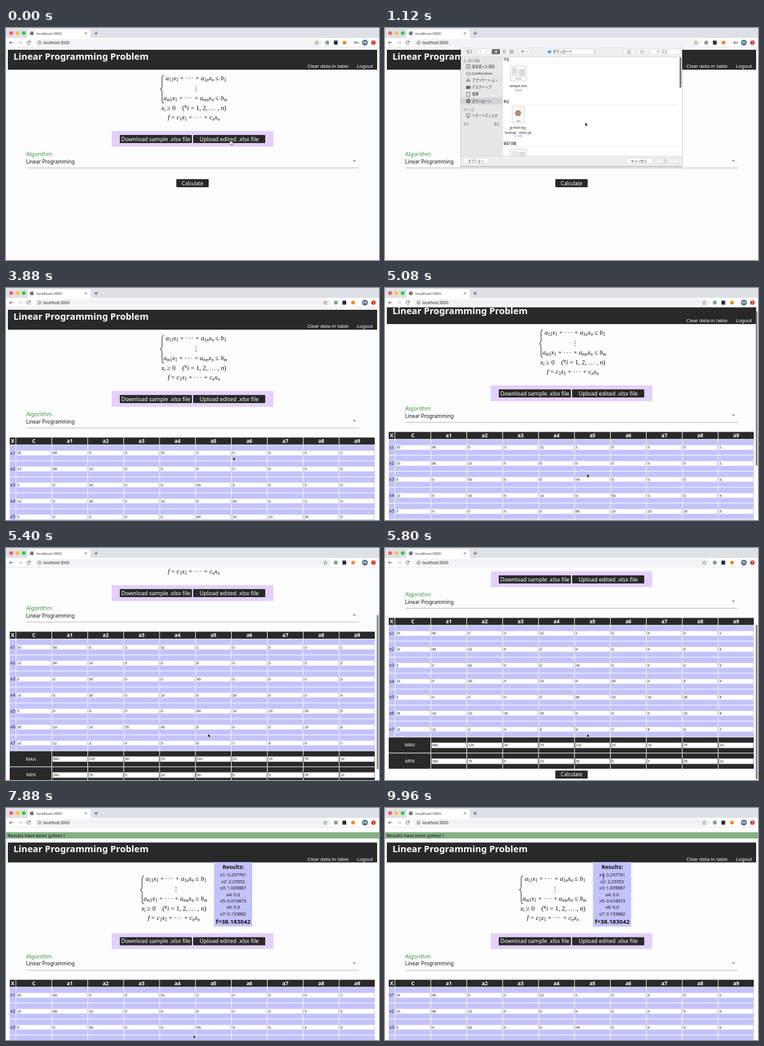
An HTML page that plays this animation: 600 px wide and 373 px high, repeating every 10000 ms.

```html
<!DOCTYPE html>
<html lang="en">
<head>
<meta charset="utf-8">
<style>
html, body { margin: 0; width: 100%; height: 100%; overflow: hidden; background: #fdfdfd; }
svg { display: block; width: 600px; height: 373px; }
text { font-family: "Noto Sans", "Open Sans", sans-serif; white-space: pre; }
#sheet text { font-family: "Noto Sans CJK JP", "Noto Sans CJK", "Noto Sans", sans-serif; }
#formula text { font: 10.6px "Liberation Serif", serif; text-anchor: middle; }
#formula i { font-style: italic; }
.cell { font-family: "Liberation Sans", Arial, sans-serif; }
</style>
</head>
<body>
<svg id="stage" viewBox="0 0 600 373" xmlns="http://www.w3.org/2000/svg"></svg>
<script>
const DARK = '#292929', LILAC = '#c3c3fc', INK = '#111';
const LOOP = 10, UPLOADED = 3.64, SOLVED = 7.44, SELECTED = 1.72;

const rect = (x, y, w, h, fill, more = '') =>
  `<rect x="${x}" y="${y}" width="${w}" height="${h}" fill="${fill}" ${more}/>`;
const text = (x, y, size, str, fill = INK, more = '') =>
  `<text x="${x}" y="${y}" font-size="${size}" fill="${fill}" ${more}>${str}</text>`;
const mid = (x, y, size, str, fill, more = '') =>
  text(x, y, size, str, fill, 'text-anchor="middle" ' + more);
const dot = (x, y, r, fill, more = '') => `<circle cx="${x}" cy="${y}" r="${r}" fill="${fill}" ${more}/>`;
const line = (d, color, width = 1, more = '') =>
  `<path d="${d}" fill="none" stroke="${color}" stroke-width="${width}" ${more}/>`;
const group = (id, ...parts) => `<g id="${id}">${parts.join('')}</g>`;
const button = (x, y, w, label, size) =>
  rect(x, y, w, 13, DARK, 'rx="1"') + mid(x + w / 2, y + 9.7, size, label, '#fff');

// Math: *x* is italic, _x_ a subscript, ^x^ a superscript
function math(x, y, src) {
  const body = src
    .replace(/\*(.+?)\*/g, '<tspan font-style="italic">$1</tspan>')
    .replace(/_(.+?)_/g, '<tspan font-size="7.2" dy="2">$1</tspan><tspan dy="-2">\u200b</tspan>')
    .replace(/\^(.+?)\^/g, '<tspan font-size="6.5" dy="-3">$1</tspan><tspan dy="3">\u200b</tspan>')
    .replace(/~/g, '<tspan letter-spacing="1">···</tspan>');
  return `<text x="${x}" y="${y}" fill="${INK}">${body}</text>`;
}

function formula() {
  const row = (y, r, x) => math(x, y, `*a*_${r}1_*x*_1_ + ~ + *a*_${r}*n*_*x*_*n*_ ≤ *b*_${r}_`);
  return group('formula',
    line('M254 76q-3 0-3 4v14q0 4-3 4.500q3 .5 3 4.500v14q0 4 3 4', INK, 0.9),
    row(84, '1', 305.5), [94.5, 98, 101.5].map(y => dot(305.5, y, 0.65, INK)).join(''),
    math(304.5, 116, '*a*_*m*1_*x*_1_ + ~ + *a*_*mn*_*x*_*n*_ ≤ *b*_*m*_'),
    math(302, 132, '*x*_*i*_ ≥ 0    (^∀^*i* = 1, 2, … , *n*)'),
    math(302, 147, '*f* = *c*_1_*x*_1_ + ~ + *c*_*n*_*x*_*n*_'));
}

function table() {
  const rows = ['20 60 5 3 31 1 0 0 0 1', '10 80 10 5 0 0 0 0 5 2', '5 0 50 0 0 45 5 0 0 3',
    '10 5 30 5 10 0 50 0 0 4', '5 0 0 0 0 60 10 10 20 5', '35 10 10 25 45 0 0 0 10 6',
    '10 11 3 4 5 6 7 8 9 7', ' 900 125 30 70 110 15 15 75 14', ' 200 75 5 10 50 5 5 25 12'];
  const colX = c => 16.4 + 57.78 * c, width = 56.8;
  const head = (x, w, s) => rect(x, 240.4, w, 11.3, DARK) + mid(x + w / 2, 249.2, 8.2, s, '#fff', 'font-weight="700"');
  let out = head(6, 9.5, 'X');
  for (let c = 0; c < 10; c++) out += head(colX(c), width, c ? 'a' + c : 'C');
  rows.forEach((row, r) => {
    const y = 252.6 + 25.7 * r, limit = r > 6, fill = limit ? DARK : LILAC;
    out += rect(6, y, limit ? 67.2 : 9.5, 24.7, fill);
    out += limit ? mid(40, y + 15, 7.8, r > 7 ? 'MIN' : 'MAX', '#fff') : mid(10.9, y + 15, 7.6, 'x' + (r + 1), '#223');
    row.split(' ').forEach((v, c) => {
      if (!v) return;
      const x = colX(c);
      out += rect(x, y, width, 24.7, fill) +
        rect(x + 0.9, y + 8.6, width - 1.5, 8.2, '#fff', 'stroke="#c4c4cc" stroke-width=".6"') +
        text(x + 2, y + 14.8, 5.4, v, INK, 'class="cell"');
    });
  });
  return group('table', out);
}

function results() {
  const values = ['0.297761', '2.25552', '1.009887', '0.0', '0.616873', '0.0', '0.153882'];
  return group('results',
    rect(0, 39, 600, 10, '#84b184'), text(3, 46.5, 7.4, 'Results have been gotten !'),
    rect(334.5, 87, 61.5, 103.5, LILAC),
    mid(365.5, 98, 8.8, 'Results:', INK, 'font-weight="700"'),
    ...values.map((v, i) => mid(365.5, 110.4 + 10.4 * i, 7.1, `x${i + 1}: ${v}`)),
    mid(365.5, 186, 9.6, 'f=38.183042', INK, 'font-weight="700"'));
}

function page() {
  return group('page',
    group('header', rect(3, 35, 594, 32, DARK),
      text(12, 50.6, 14.7, 'Linear Programming Problem', '#fff', 'font-weight="600"'),
      text(485, 64, 7.75, 'Clear data in table', '#fff'), text(564.5, 64, 7.75, 'Logout', '#fff')),
    formula(),
    group('lower', rect(170, 165.5, 260, 25.5, '#e3d1fb'),
      button(183, 172, 116, 'Download sample .xlsx file', 8.95),
      button(301, 172, 116, 'Upload edited .xlsx file', 8.95),
      text(32.5, 206, 8.75, 'Algorithm', '#3d8f43'), text(32.5, 217.6, 8, 'Linear Programming'),
      line('M33 225H567.500', '#a5a5a5', 0.8), '<path d="M558 212.500h5l-2.500 2.800z" fill="#888"/>',
      table(), group('calc', button(274, 243, 52, 'Calculate', 8))),
    results());
}

function sheet() {
  const box = (x, w) => rect(x, 34, w, 8, '#fff', 'rx="1.5" stroke="#ccc" stroke-width=".5"');
  const gray = '#666';
  const push = (x, label, fill = '#fff', ink = '#222', id = '') =>
    rect(x, 209.500, 41, 8, fill, `rx="1.5" stroke="#c4c4c4" stroke-width=".5" ${id}`) + mid(x + 20.5, 215.5, 5.2, label, ink);
  const places = ['最近使った項目', 'Cumbra Drive', 'アプリケーション', 'デスクトップ', '書類', 'ダウンロード'];
  const icons = [
    rect(131, 59, 6, 6, 'none', `stroke="${gray}" stroke-width=".8"`) + line('M132.500 61h3m-3 2h3', gray, 0.7),
    line('M131.500 75q-2-2.500 1-3q1-3 3.500 0q3 .5 1.500 3z', gray, 0.8),
    line('M131 87l3-6l3 6m-6-2h6', gray, 0.9),
    rect(130.5, 93, 7, 5, gray), rect(131.5, 103.5, 5, 6.5, 'none', `stroke="${gray}" stroke-width=".8"`),
    dot(134, 117.5, 3.3, '#555') + line('M134 115.500v3.500m-1.500-1.500l1.500 1.500l1.500-1.500', '#fff', 0.8)];
  const doc = (x, y, w, h) => rect(x, y, w, h, '#fafafa', 'stroke="#bbb" stroke-width=".6"');
  const sample = y => doc(202, y, 25, 24) + rect(204, y + 2, 9, 15, '#e8e8e8') + rect(215, y + 5, 10, 12, '#ddd') +
    line(`M205 ${y + 5}h7m-7 3h7m-7 3h7m4-2h8m-8 3h8`, '#bbb', 0.6) + mid(214.5, y + 22, 4, 'XLSX', '#777');
  const heading = (y, s) => text(191, y, 4.3, s, '#333', 'font-weight="700"') + line(`M191 ${y + 3.5}H472`, '#e1e1e1', 0.6);
  return group('sheet',
    rect(121, 28, 358, 196, '#000', 'opacity=".1" rx="2"'), rect(121.500, 28, 357, 195, '#000', 'opacity=".2"'),
    rect(122, 28, 356, 194, '#efefef'), rect(122, 46.5, 67, 160, '#e7e7e8'), rect(189, 46.5, 289, 159.5, '#fff'),
    line('M122 46.500H478M122 206H478M189 46.500V206', '#ccc', 0.6),
    box(129, 13) + rect(132, 36, 7, 4, 'none', 'stroke="#555" stroke-width=".7"') + line('M134 36v4', '#555', 0.7),
    box(149, 20) + line('M154.500 36l-2 2l2 2m8-4l2 2l-2 2', '#999', 0.7),
    box(172, 38) + rect(172, 34, 13, 8, '#666', 'rx="1.5"'),
    [176.5, 179].map(x => rect(x, 36, 1.6, 1.6, '#fff') + rect(x, 38.5, 1.6, 1.6, '#fff')).join(''),
    line('M189 36h6m-6 2h6m-6 2h6M200.500 36h6v4h-6zm2 0v4m2-4v4', '#666', 0.7),
    box(215, 17) + line('M219 36.500h5m-5 2h5m3-.5l1 1l1-1', '#666', 0.9),
    box(258, 84) + rect(261.5, 36, 6, 4.5, '#52a7e0', 'rx=".6"') + text(270, 40, 5.2, 'ダウンロード') +
      line('M336.500 37l1-1.500l1 1.500m-2 2l1 1.500l1-1.500', '#555', 0.7),
    box(384, 17) + line('M391 37.500h-1v3h5v-3h-1m-1.500 1.500v-4m-1.200 1.200l1.200-1.200l1.200 1.200', '#555', 0.6),
    box(406, 15) + rect(410.5, 36.5, 6, 3.2, 'none', 'rx="1" stroke="#555" stroke-width=".6"'),
    box(426, 48) + dot(439, 37.5, 1.5, 'none', 'stroke="#777" stroke-width=".6"') + line('M440 38.500l1.500 1.500', '#777', 0.6) +
      text(444.500, 40, 5.2, '検索', '#999'),
    rect(122, 112, 67, 11, '#d3d3d5'),
    text(126, 53.5, 4.4, 'よく使う項目', '#555'),
    ...places.map((s, i) => icons[i] + text(140, 64 + 11.1 * i, 5.2, s, '#222')),
    text(126, 132.5, 4.4, 'デバイス', '#555'), line('M131 138h6v4h-6zm3 4v2m-2 0h4', gray, 0.8),
    text(140, 143, 5.2, 'リモートディスク', '#222'),
    text(126, 155.5, 4.4, 'タグ', '#555'), text(175.5, 155.5, 4.4, '表示', '#555'),
    heading(52.3, '今日'), group('selBox', rect(199, 57.5, 31, 31, '#d5d5d5', 'rx="2"')), sample(61),
    group('selLabel', rect(197.5, 89.5, 33.5, 7.2, '#1660d8', 'rx="1.5"')),
    mid(214.3, 95, 5.2, 'sample.xlsx', INK, 'id="sampleName"'), mid(214.3, 101.5, 4.3, '10 KB', '#4a7ee0'),
    heading(120, '昨日'), doc(204.5, 126, 19.5, 26), dot(214, 137, 5, '#b08d77'), mid(214.3, 150.5, 4, 'JAR', '#777'),
    mid(214.3, 162, 5.1, 'jp-fout-log-'), mid(214.3, 169.5, 5.1, 'hadoop...ution.jar'), mid(214.3, 175.5, 4.3, '1.9 MB', '#7f9ee8'),
    heading(187, '過去7日間'), doc(202, 194.5, 25, 11.3), rect(204, 197, 9, 8.5, '#e8e8e8'), rect(215, 199, 10, 6.5, '#ddd'),
    rect(473.8, 47, 3, 49, '#777', 'rx="1.5"'),
    push(126, 'オプション'), push(388, 'キャンセル'), push(433, '開く', '#f4f4f4', '#aaa'),
    group('openBtn', push(433, '開く', '#2b78ee', '#dceaff')));
}

function chrome() {
  const lights = ['#fc5b57', '#fdbc40', '#34c84a'];
  return group('chrome',
    rect(0, 0, 600, 17, '#dee1e6'), rect(0, 16, 600, 15, '#fff'), line('M0 30.800H600', '#d5d5d5', 0.6),
    ...lights.map((c, i) => dot(8.3 + 10.1 * i, 8.2, 3, c)),
    '<path d="M32 16.500q3 0 3-3V5q0-3 3-3h95q3 0 3 3v8.500q0 3 3 3z" fill="#fff"/>',
    dot(41.5, 8.5, 3, '#555'), line('M39.500 7.500q2-1.500 2 0t2 .5m-3 2.500l1-1', '#eee', 0.8),
    text(49, 10.7, 6.05, 'localhost:3000', '#333'),
    line('M127 7l3 3m0-3l-3 3M142 8.500h6m-3-3v6', '#555', 0.9),
    line('M11.500 23.500h-6m2.700-2.700l-2.700 2.700l2.700 2.700', '#555', 0.9),
    line('M19.500 23.500h6m-2.700-2.700l2.700 2.700l-2.700 2.700', '#bbb', 0.9),
    line('M38.800 22.300a2.600 2.600 0 1 0 .2 2m0-3.800v2h-2', '#555', 0.9),
    rect(46, 17.8, 463, 11.4, '#f1f3f4', 'rx="5.7" id="omnibox"'),
    dot(54, 23.5, 2.6, 'none', 'stroke="#555" stroke-width=".7"'), line('M54 23v2m0-3.300v.7', '#555', 0.7),
    text(60, 25.8, 6.2, 'localhost:3000', '#222'),
    group('tools',
      line('M500 20.600l.9 1.900l2.100.3l-1.500 1.500l.4 2.100l-1.900-1l-1.900 1l.4-2.100l-1.500-1.500l2.100-.3z', '#555', 0.6),
      dot(516.8, 23.5, 3.2, '#7fa68a'), rect(527.5, 20.3, 6, 6.4, '#252b35'), dot(544.5, 23.5, 3, '#ef8a2c')),
    group('key', dot(562, 23.5, 1.5, 'none', 'stroke="#555" stroke-width="1"'), line('M563.500 23.500h3.500v1.500', '#555', 1)),
    dot(577.3, 23.5, 4.8, '#5d7889'), mid(577.3, 25.2, 4.4, 'Mo', '#fff'),
    dot(591, 23.5, 3.6, '#d9372c'), line('M591 21.500v2.300m0 .9v.8', '#fff', 0.9));
}

function pointer() {
  const shape = (id, d, fill, stroke, w) =>
    `<path id="${id}" d="${d}" fill="${fill}" stroke="${stroke}" stroke-width="${w}" stroke-linejoin="round"/>`;
  return group('pointer',
    shape('arrow', 'M0 0v6.200l1.400-1.300l1 2.300l1.100-.5l-1-2.200h2z', '#000', '#fff', 0.6),
    shape('hand', 'M-.8.800q0-1 .7-1t.7 1v2l2.300.5q1 .2.900 1.300l-.4 2q-.2 1-1 1h-2q-.7 0-1.200-.8l-1.800-2.300q-.4-.8.400-.9l1.400.700z', '#fff', '#111', 0.6),
    shape('beam', 'M-1.300-3.500q1.300 0 1.300.8v5.400q0 .8-1.300.8m2.600-7q-1.300 0-1.300.8v5.400q0 .8 1.300.8', 'none', '#222', 0.7));
}

const stage = document.getElementById('stage');
stage.innerHTML = rect(0, 0, 600, 373, '#fdfdfd') + page() +
  rect(596.5, 31, 2.6, 248, '#7d7d7d', 'rx="1.3" id="thumb"') + sheet() + chrome() + pointer();
const el = {};
stage.querySelectorAll('[id]').forEach(n => el[n.id] = n);

const clamp = v => Math.max(0, Math.min(1, v));
const ease = v => (v = clamp(v), v * v * (3 - 2 * v));
const show = (name, on) => el[name].setAttribute('display', on ? 'inline' : 'none');
const move = (name, x, y) => el[name].setAttribute('transform', `translate(${x} ${y})`);

// Pointer stops: seconds, x, y
const path = [[0, 361.5, 180], [0.9, 361.5, 180], [1.55, 214, 74], [2.05, 214, 74], [2.7, 449, 215.5],
  [3.2, 449, 215.5], [4.3, 325, 298.5], [6.3, 325, 298.5], [6.9, 301.5, 364.5], [7.95, 301.5, 364.5],
  [9.3, 362, 140], [9.8, 351.5, 110.5], [10, 351.5, 110.5]];

function pointerAt(t) {
  const i = Math.max(1, path.findIndex(p => p[0] > t)), [t0, x0, y0] = path[i - 1], [t1, x1, y1] = path[i];
  const k = ease((t - t0) / (t1 - t0));
  return [x0 + (x1 - x0) * k, y0 + (y1 - y0) * k];
}

function draw(t) {
  const loaded = t >= UPLOADED, solved = t >= SOLVED, selected = t >= SELECTED;
  const glide = 8.4 * Math.max(0, t - 5.03);
  const scroll = solved ? 0 : 129.5 * (1 - (1 + glide) * Math.exp(-glide));
  move('page', 0, -scroll);
  move('header', 0, solved ? 20.5 : 0);
  move('formula', solved ? -32 : 0, solved ? 33 : 0);
  move('lower', 0, solved ? 35.8 : 0);
  move('calc', 0, loaded ? 242.7 : 0);
  show('table', loaded);
  show('results', solved);

  move('thumb', 0, scroll * 342 / 472);
  el.thumb.setAttribute('opacity', t < 5.03 ? 0 : clamp((6.22 - t) / 0.15));

  const open = ease((t - 0.44) / 0.24) * (1 - ease((t - 2.98) / 0.2));
  show('sheet', open > 0);
  move('sheet', 0, -196 * (1 - open));
  ['selBox', 'selLabel', 'openBtn'].forEach(n => show(n, selected));
  el.sampleName.setAttribute('fill', selected ? '#fff' : INK);

  show('key', !loaded);
  move('tools', loaded ? 13.7 : 0, 0);
  el.omnibox.setAttribute('width', loaded ? 476 : 463);

  const hand = t < 0.5 || (t > 6.82 && t < SOLVED), beam = t > 9.2;
  show('hand', hand);
  show('beam', beam);
  show('arrow', !hand && !beam);
  move('pointer', ...pointerAt(t));
}

function tick(now) {
  draw(now / 1000 % LOOP);
  requestAnimationFrame(tick);
}
draw(0);
requestAnimationFrame(tick);
</script>
</body>
</html>
```
